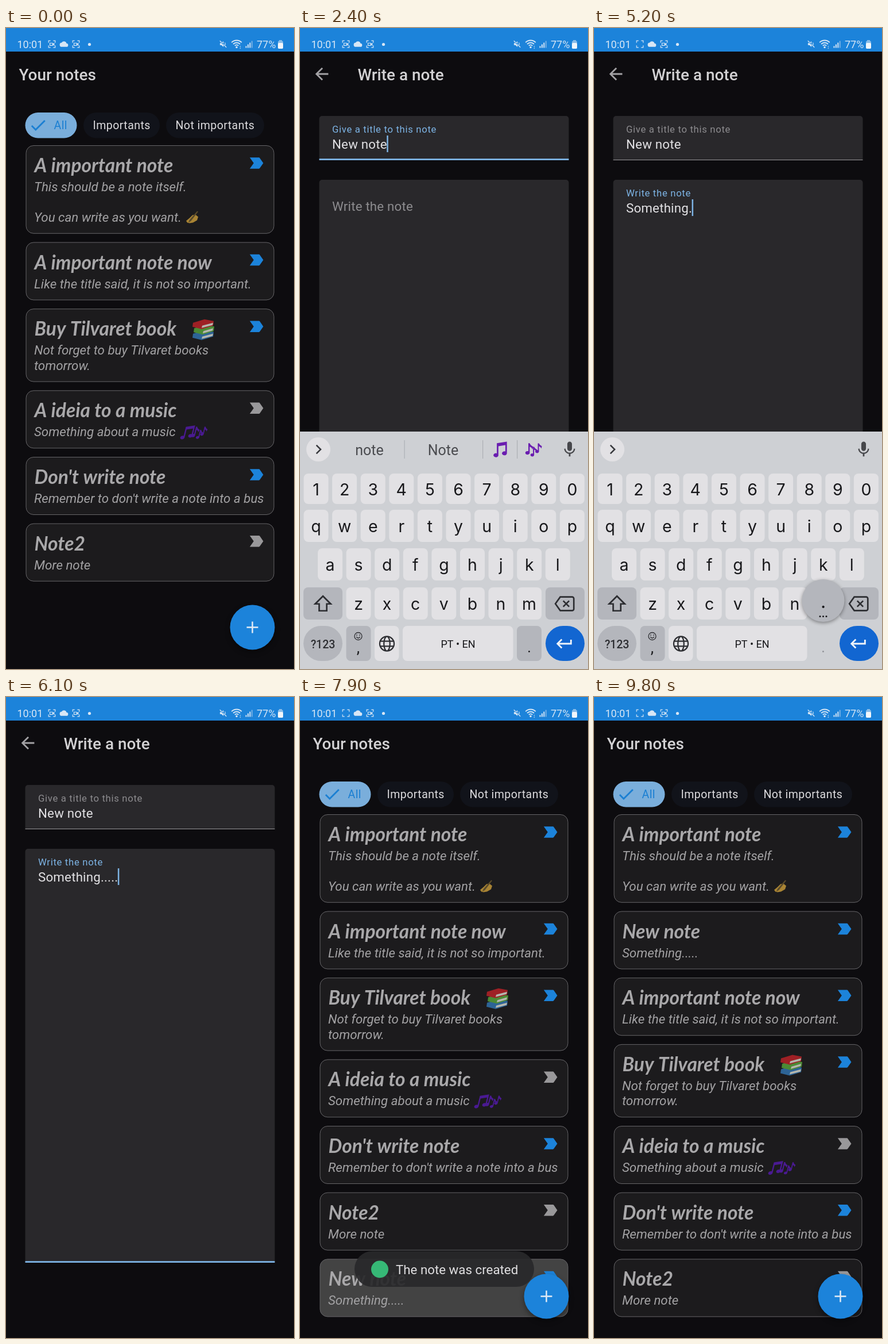
These frames come from a looping animation (502 px wide and 1115 px high, 9.9 s). An HTML page with a canvas:

```html
<!DOCTYPE html>
<html lang="en">
<head>
<meta charset="utf-8">
<title>Notes</title>
<style>
html, body { margin: 0; height: 100%; overflow: hidden; background: #0d0c0f; }
canvas { display: block; width: 502px; height: 1115px; }
</style>
</head>
<body>
<canvas id="stage"></canvas>
<script>
const W = 502, H = 1115, LOOP = 9900;
const canvas = document.getElementById("stage"), c = canvas.getContext("2d");
const dpr = window.devicePixelRatio || 1;
canvas.width = W * dpr;
canvas.height = H * dpr;

const BLUE = "#1c83da", SKY = "#7db4e5", BG = "#0d0c0f", KEY = "#e2e1e4", DARK_KEY = "#b4b6bc", INK = "#18181b", ICON = "#46474b";
const SANS = "Roboto, sans-serif";

const clamp = v => Math.max(0, Math.min(1, v));
const smooth = v => (v = clamp(v), v * v * (3 - 2 * v));
const seg = (t, a, b) => smooth((t - a) / (b - a));
const mix = (a, b, p) => a + (b - a) * p;

// ---- drawing helpers ----
function text(s, x, y, size, color, { style = "", align = "left", gap = 0, family = SANS } = {}) {
  c.font = `${style} ${size}px ${family}`;
  c.letterSpacing = gap + "px";
  c.textAlign = align;
  c.fillStyle = color;
  c.fillText(s, x, y);
  return c.measureText(s).width;
}
function box(x, y, w, h, r, fill, stroke) {
  c.beginPath();
  c.roundRect(x, y, w, h, r);
  if (fill) { c.fillStyle = fill; c.fill(); }
  if (stroke) { c.strokeStyle = stroke; c.lineWidth = 1; c.stroke(); }
}
function disc(x, y, r, fill) {
  c.beginPath();
  c.arc(x, y, r, 0, 7);
  c.fillStyle = fill;
  c.fill();
}
// Paths live in a 24 x 24 box; a line width turns the fill into a stroke.
function icon(d, x, y, scale, color, line, skew = 0) {
  c.save();
  c.translate(x, y);
  c.transform(scale, 0, -skew * scale, scale, 0, 0);
  c.translate(-12, -12);
  c.fillStyle = c.strokeStyle = color;
  c.lineWidth = line;
  line ? c.stroke(new Path2D(d)) : c.fill(new Path2D(d));
  c.restore();
}
function shadowed(blur, dy, draw) {
  c.save();
  c.shadowColor = "rgba(0,0,0,.4)";
  c.shadowBlur = blur * dpr;
  c.shadowOffsetY = dy * dpr;
  draw();
  c.restore();
}

const ICONS = {
  back: "M20 11H7.83l5.59-5.59L12 4l-8 8 8 8 1.41-1.41L7.83 13H20z",
  check: "M9 16.17L4.83 12l-1.42 1.41L9 19 21 7l-1.41-1.41z",
  label: "M4 19h11.5q.8 0 1.2-.8L21 12l-4.3-6.2q-.4-.8-1.2-.8H4l5 7z",
  mic: "M12 14c1.66 0 3-1.34 3-3V5c0-1.66-1.34-3-3-3S9 3.34 9 5v6c0 1.66 1.34 3 3 3zm5.3-3c0 3-2.54 5.1-5.3 5.1S6.7 14 6.7 11H5c0 3.41 2.72 6.23 6 6.72V21h2v-3.28c3.28-.48 6-3.3 6-6.72z",
  erase: "M7 4h14a2 2 0 0 1 2 2v12a2 2 0 0 1-2 2H7L1.3 12zM10.5 8.5l7 7M17.5 8.5l-7 7",
  shift: "M12 3.5L3 12.5h4.6v8h8.8v-8H21z",
  enter: "M19 7v4H5.83l3.58-3.59L8 6l-6 6 6 6 1.41-1.41L5.83 13H21V7z",
  globe: "M2.5 12a9.5 9.5 0 1 0 19 0a9.5 9.5 0 1 0-19 0M3.2 8.7h17.6M3.2 15.3h17.6M8 12a4 9.5 0 1 0 8 0a4 9.5 0 1 0-8 0",
  cloud: "M19.35 10A7.5 7.5 0 0 0 5.35 8 6 6 0 0 0 6 20h13a5 5 0 0 0 .35-10z",
  frame: "M2 8V2h6M16 2h6v6M22 16v6h-6M8 22H2v-6",
  camera: "M6 9h8v7H6zM14.5 12.5l4-3v6z",
  mute: "M3 9v6h4l6 5V4L7 9zM3.5 2L22 20.5l-1.5 1.5L2 3.5zM16 8q3 4 0 8l1 1q4-5 0-10z",
  sticker: "M5 3h14a2 2 0 0 1 2 2v9l-7 7H5a2 2 0 0 1-2-2V5a2 2 0 0 1 2-2zM21 14h-5a2 2 0 0 0-2 2v5M7.5 8.5h2M14 8.5h3M7 12q4 5 8 0",
  smile: "M2 12a10 10 0 1 0 20 0a10 10 0 1 0-20 0M7 13.5q5 7 10 0M8 7.5v3M16 7.5v3",
  next: "M9 5.5l6.5 6.5L9 18.5",
  prev: "M15 5.5L8.5 12l6.5 6.5",
  pair: "M8 4L21 2V17a3.2 2.6 0 1 1-2-2.4V6.5L10 8V19.5a3.2 2.6 0 1 1-2-2.4z",
  note: "M7 4h2q1 3 5 5l-1 4q-1-3-4-4V18a3.2 2.6 0 1 1-2-2.4z",
  hand: "M1 17l6-5 5-5 5-1 5 4-2 6-7 4-6 1-4-1z",
  pen: "M20 1l2 1L8 20l-5 3 2-5z"
};

function musicPair(x, y, s, color, skew) { icon(ICONS.pair, x, y, s, color, 0, skew); }
function musicTrio(x, y, s, color, skew) {
  icon(ICONS.note, x - 5 * s, y - s, s, color, 0, skew);
  icon(ICONS.note, x + s, y + 3 * s, s * .85, color, 0, skew);
  icon(ICONS.note, x + 8 * s, y - 2 * s, s * .85, color, 0, skew);
}
function books(x, y) {
  ["#2d6496", "#4c8a35", "#9e2025"].forEach((color, i) => {
    const top = y + 8 - i * 9.5, dx = i === 1 ? 2 : 0;
    c.beginPath();
    c.moveTo(x - 18 + dx, top); c.lineTo(x + 2 + dx, top - 6);
    c.lineTo(x + 18 + dx / 2, top - 3); c.lineTo(x + 17 + dx / 2, top + 5);
    c.lineTo(x - 3 + dx, top + 11); c.lineTo(x - 19 + dx, top + 7);
    c.fillStyle = color;
    c.fill();
    c.beginPath();
    c.moveTo(x - 2 + dx, top + 5); c.lineTo(x + 17, top);
    c.lineTo(x + 16, top + 4); c.lineTo(x - 3 + dx, top + 9);
    c.fillStyle = "#b5b6ae";
    c.fill();
  });
}

// ---- status bar ----
function statusBar(t) {
  const col = "#d7e6f5";
  c.fillStyle = BLUE;
  c.fillRect(0, 0, W, 41);
  text("10:01", 19.5, 34.5, 18, col);
  icon(ICONS.frame, 80, 28, .58, col, 2);
  if (t % 2000 < 800) icon(ICONS.camera, 80, 28, .58, col, 2);
  icon(ICONS.cloud, 101, 28, .6, col);
  icon(ICONS.frame, 122, 28, .58, col, 2);
  icon(ICONS.camera, 122, 28, .58, col, 2);
  disc(145.5, 28.5, 2.6, col);
  icon(ICONS.mute, 378.5, 28, .62, col);
  c.strokeStyle = col;
  c.lineWidth = 1.9;
  for (const r of [4.5, 8.5, 12.5]) {
    c.beginPath();
    c.arc(402, 34, r, -2.35, -.79);
    c.stroke();
  }
  disc(402, 33.5, 1.7, col);
  text("↕", 406, 36, 9, col);
  for (let i = 0; i < 4; i++) {
    c.fillStyle = i < 3 ? col : "#78b1e4";
    c.fillRect(417.5 + i * 3.4, 31.5 - i * 3, 2, 3 + i * 3);
  }
  text("77%", 437, 34.5, 18, col);
  box(474, 22.5, 9, 13.5, 2, "#8abde9");
  box(476, 21, 5, 2, 0, "#8abde9");
  box(474, 26, 9, 10, 2, "#f1f6fb");
}

// ---- list page ----
const PITCH = 115.7, LINE = 26.4;
const CARDS = [
  { title: "A important note", body: ["This should be a note itself.", "", "You can write as you want."], hot: 1,
    extra: y => { icon(ICONS.hand, 325, y + 126, 1, "#a98434"); icon(ICONS.pen, 326, y + 124, .9, "#594a2a"); } },
  { title: "A important note now", body: ["Like the title said, it is not so important."], hot: 1 },
  { title: "Buy Tilvaret book", body: ["Not forget to buy Tilvaret books", "tomorrow."], hot: 1,
    extra: y => books(344, y + 35) },
  { title: "A ideia to a music", body: ["Something about a music"],
    extra: y => { musicPair(316, y + 72.5, 1.2, "#4a1a92", .25); musicTrio(340, y + 72.5, 1.1, "#4a1a92", .25); } },
  { title: "Don't write note", body: ["Remember to don't write a note into a bus"], hot: 1 },
  { title: "Note2", body: ["More note"] }
];
const NEW_CARD = { title: "New note", body: ["Something....."], hot: 1 };
let nextY = 204.5;
for (const card of [...CARDS, NEW_CARD]) {
  card.y = nextY;
  card.h = 100 + LINE * (card.body.length - 1);
  nextY += card.h + PITCH - 100;
}

function drawCard({ title, body, hot, extra, h }, y, fill = "#1c1b1d") {
  box(35, y, 432, h, 13, fill, "#666568");
  text(title, 49.5, y + 46.5, 33.5, "#a9a8aa", { style: "italic bold", family: "Lato, sans-serif" });
  body.forEach((s, i) => text(s, 49, y + 79.5 + i * LINE, 22.35, "#a3a2a4", { style: "italic" }));
  icon(ICONS.label, 436, y + 30.5, 1.39, hot ? BLUE : "#99989a");
  if (extra) extra(y);
}

function chip(x, w, label, labelX, on) {
  box(x, 147, w, 44.5, 22.5, on ? "#7aaedb" : "#11131a");
  text(label, labelX, 175.7, 19.5, on ? "#1b7fd2" : "#dddcdf", { gap: .45 });
}

function listPage(t) {
  text("Your notes", 22.5, 90.5, 27.9, "#d2d1d3", { style: "500" });
  chip(33.5, 90, "All", 83.5, true);
  icon(ICONS.check, 56, 169, 1.42, "#1b7fd2");
  chip(135, 133, "Importants", 151.5);
  chip(279, 171, "Not importants", 295.5);

  const made = t > 3000;
  const dragY = mix(NEW_CARD.y, CARDS[1].y, seg(t, 8150, 9300));
  CARDS.forEach((card, i) => {
    const push = made && i ? smooth((card.y + 70 - dragY) / 60) : 0;
    drawCard(card, card.y + push * PITCH);
  });
  if (made) {
    const held = seg(t, 7650, 7850) - seg(t, 8100, 8350);
    const v = n => Math.round(mix(n, 67, held));
    drawCard(NEW_CARD, dragY, `rgb(${v(28)},${v(27)},${v(29)})`);
  }

  shadowed(10, 4, () => disc(429.5, 1042.5, 39, BLUE));
  if (t < 600) disc(429.5, 1042.5, 39 * seg(t, 80, 380), "rgba(255,255,255,.2)");
  c.fillStyle = "#dce8f4";
  c.fillRect(419.5, 1041.2, 20, 2.6);
  c.fillRect(428.2, 1032.5, 2.6, 20);
}

function toast(t) {
  c.save();
  c.globalAlpha = seg(t, 6800, 7000) - seg(t, 8900, 9150);
  box(95, 964, 313, 62, 31, "rgba(41,41,43,.92)");
  disc(139, 995.5, 15, "#36b876");
  text("The note was created", 167, 1003.5, 22.3, "#e0dfe1");
  c.restore();
}

// ---- typing ----
const TITLE_FOCUS = 700, BODY_FOCUS = 2750;
const TITLE = { text: "New note", at: [1400, 1540, 1660, 1780, 1880, 1980, 2080, 2180] };
const BODY = { text: "Something.....", at: [3200, 3400, 3560, 3720, 3860, 3990, 4140, 4290, 4420, 5120, 5270, 5400, 5520, 5640] };
const typed = (f, t) => f.text.slice(0, f.at.filter(a => a <= t).length);
function pressed(t) {
  for (const f of [TITLE, BODY]) {
    const i = f.at.findIndex(a => t >= a && t < a + 115);
    if (i >= 0) return f.text[i];
  }
}

// ---- editor page ----
function field(f, y, h, hint, restY, float, focus, t, since) {
  box(33.5, y, 435, h, [5, 5, 0, 0], "#29282b");
  const line = focus ? 2.8 : 1;
  c.fillStyle = focus ? SKY : "#98979a";
  c.fillRect(33.5, y + h - line, 435, line);
  text(hint, 56, mix(restY, y + 29, float), mix(22.3, 16.7, float), focus ? SKY : "#8d8c8f", { gap: mix(.2, .68, float) });
  const s = typed(f, t);
  const w = text(s, 56, y + 57, 22.3, "#e2e1e4", { gap: .2 });
  const last = Math.max(since, ...f.at.filter(a => a <= t));
  if (focus && (t - last) % 1000 < 500) {
    c.fillStyle = SKY;
    c.fillRect(56 + w - .5, y + 34, 2.5, 29);
  }
}
function editorPage(t) {
  icon(ICONS.back, 38, 80, 1.42, "#a3a2a5");
  text("Write a note", 100.5, 90.5, 27.9, "#d2d1d3", { style: "500" });
  const inBody = t >= BODY_FOCUS;
  field(TITLE, 153, 77, "Give a title to this note", 200, seg(t, TITLE_FOCUS, TITLE_FOCUS + 170), t >= TITLE_FOCUS && !inBody, t, TITLE_FOCUS);
  field(BODY, 264, 720, "Write the note", 318, seg(t, BODY_FOCUS, BODY_FOCUS + 170), inBody, t, BODY_FOCUS);
}

// ---- keyboard ----
const ROWS = [["1234567890", 28, 801.5, 53], ["qwertyuiop", 28, 866, 56], ["asdfghjkl", 52.5, 933, 56], ["zxcvbnm", 102, 1001, 56]];
const STEP = 49.6;
const KEY_FONT = { align: "center", family: "Inter, sans-serif" };

function keySpot(ch) {
  if (ch === ".") return [399.5, 1071];
  for (const [keys, x, y] of ROWS) {
    const i = keys.indexOf(ch.toLowerCase());
    if (i >= 0) return [x + i * STEP, y];
  }
}
function divider(x) { c.fillStyle = "#adb0b5"; c.fillRect(x, 717, 1.2, 32); }

function toolStrip(t) {
  const s = typed(t >= BODY_FOCUS ? BODY : TITLE, t);
  disc(32, 733, 21, KEY);
  icon(s ? ICONS.next : ICONS.prev, 32, 733, 1.15, "#38393d", 2.2);
  icon(ICONS.mic, 470, 733, 1.35, ICON);
  if (!s) {
    icon(ICONS.sticker, 102, 733, 1.35, ICON, 2);
    text("GIF", 171.5, 740.5, 20, ICON, { style: "bold", align: "center", gap: .6 });
    disc(241.5, 733, 8.8, ICON);
    for (let i = 0; i < 8; i++) {
      c.save();
      c.translate(241.5, 733);
      c.rotate(i * Math.PI / 4);
      box(-3, -11.5, 6, 5, 1, ICON);
      c.restore();
    }
    disc(241.5, 733, 4, "#ced0d4");
    box(300, 722, 23, 23, 3, "#5b5c60");
    divider(354.5);
    for (const x of [391.5, 399.5, 407.5]) disc(x, 733, 2.5, ICON);
    return;
  }
  const word = s.split(" ").pop();
  if (!word || word.includes(".")) return;
  const opt = { align: "center" };
  text(word.toLowerCase(), 121, 743, 25, "#4a4b4f", opt);
  text(word[0].toUpperCase() + word.slice(1), 249.5, 743, 25, "#4a4b4f", opt);
  divider(181.5);
  divider(318);
  if (word === "note") {
    musicPair(348.5, 733, 1.35, "#6a1db0", 0);
    divider(378);
    musicTrio(410, 733, 1.2, "#6a1db0", 0);
  }
}

function keyboard(t) {
  const caps = t < TITLE.at[0] || (t >= BODY_FOCUS && t < BODY.at[0]);
  const down = pressed(t);
  c.fillStyle = "#ced0d4";
  c.fillRect(0, 702, W, 413);
  toolStrip(t);
  ROWS.forEach(([keys, x, y, h], row) => {
    [...keys].forEach((k, i) => {
      const cx = x + i * STEP;
      box(cx - 21.5, y - h / 2, 43, h, 8, KEY);
      text(caps ? (row ? k.toUpperCase() : "!@#$%^&*()"[i]) : k, cx, y + 11, 28.5, INK, KEY_FONT);
    });
  });
  box(6, 973, 68, 56, 8, DARK_KEY);
  icon(ICONS.shift, 40, 1001, 1.5, "#2d2e32", caps ? 0 : 1.8);
  box(428, 973, 68, 56, 8, DARK_KEY);
  icon(ICONS.erase, 461, 1001.5, 1.48, "#2d2e32", 1.8);

  box(6, 1040, 68, 61, 30.5, DARK_KEY);
  text("?123", 40, 1078.5, 19.5, "#2d2e32", { style: "500", align: "center" });
  box(80.5, 1040, 43, 61, 8, DARK_KEY);
  icon(ICONS.smile, 101.5, 1058, .65, "#2d2e32", 2);
  text(",", 101.5, 1086.5, 27, INK, { align: "center" });
  box(130, 1040, 42.5, 61, 8, KEY);
  icon(ICONS.globe, 151.5, 1071, 1.32, "#2d2e32", 1.7);
  box(179, 1040, 192.5, 61, 8, down === " " ? "#c3c4c8" : KEY);
  text("PT • EN", 275.5, 1077.5, 18, INK, { align: "center" });
  if (down !== ".") box(378, 1040, 43, 61, 8, DARK_KEY);
  text(".", 399.5, 1086, 25, down === "." ? "#8e9095" : INK, { align: "center" });
  box(428, 1040, 68, 61, 30.5, "#1266d1");
  icon(ICONS.enter, 461, 1071, 1.42, "#eef3fa");

  if (down && down !== " ") {
    const [x, y] = keySpot(down), dot = down === ".";
    shadowed(6, 2, () => disc(x, y - 75, 37, dot ? DARK_KEY : KEY));
    text(down, x, y - (dot ? 62 : 64), 32, INK, KEY_FONT);
    if (dot) for (const d of [-5.5, 0, 5.5]) disc(x + d, 1023.5, 1.5, INK);
  }
}

// ---- main loop ----
function draw(t) {
  c.setTransform(dpr, 0, 0, dpr, 0, 0);
  c.fillStyle = BG;
  c.fillRect(0, 0, W, H);
  const edit = seg(t, 350, 600) - seg(t, 6100, 6350);
  if (edit < 1) listPage(t);
  if (edit > 0) {
    c.globalAlpha = edit;
    c.fillStyle = BG;
    c.fillRect(0, 0, W, H);
    editorPage(t);
    c.globalAlpha = 1;
  }
  const up = seg(t, 700, 980) - seg(t, 5780, 6040);
  if (up > 0) {
    c.save();
    c.translate(0, 413 * (1 - up));
    keyboard(t);
    c.restore();
  }
  statusBar(t);
  toast(t);
}
function tick() {
  draw(performance.now() % LOOP);
  requestAnimationFrame(tick);
}
tick();
</script>
</body>
</html>
```
